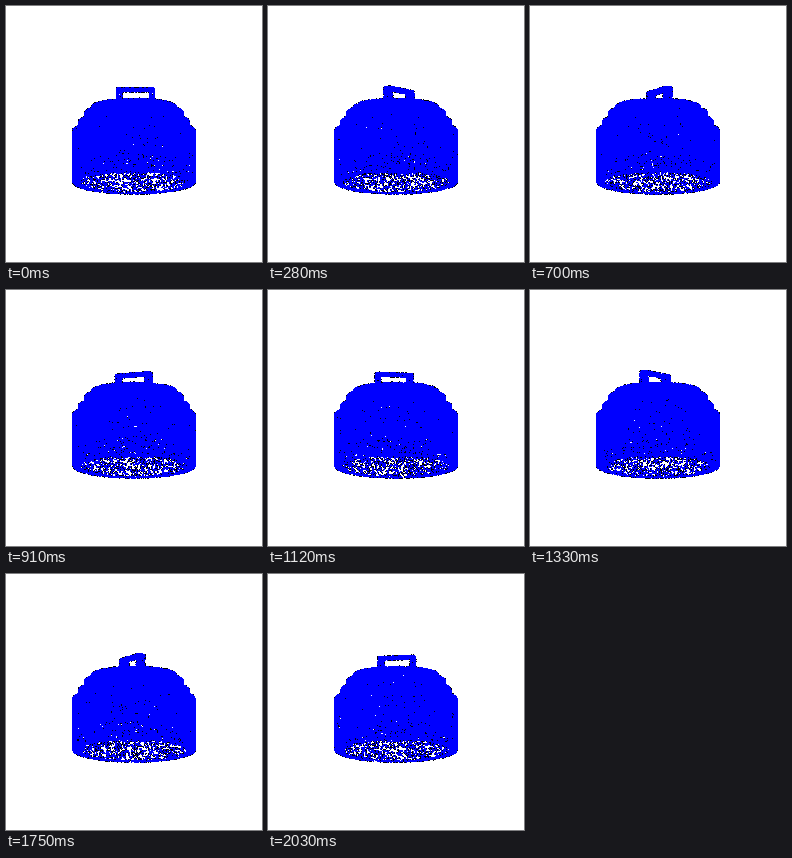
These frames come from a looping animation (256 by 256 pixels, 2100 ms). An HTML page with a canvas:

```html
<!DOCTYPE html>
<html>
<head>
<meta charset="utf-8">
<style>
html, body { margin: 0; width: 100%; height: 100%; overflow: hidden; background: #fff; }
canvas { display: block; width: 256px; height: 256px; }
</style>
</head>
<body>
<canvas id="stage" width="256" height="256"></canvas>
<script>
const SIZE = 256, STEPS = 30, STEP_MS = 70;
const CENTER = 128, HORIZON = -996, DIST = 6000, RADIUS = 1.02;
const DENSITY = 0.36;

const ctx = document.getElementById('stage').getContext('2d');
const image = ctx.createImageData(SIZE, SIZE);
const pixels = new Uint32Array(image.data.buffer);
const through = new Float32Array(SIZE * SIZE);
const points = [];

let seed = 71;
function rand() {
  seed = (seed + 0x6D2B79F5) | 0;
  let t = Math.imul(seed ^ (seed >>> 15), 1 | seed);
  t = (t + Math.imul(t ^ (t >>> 7), 61 | t)) ^ t;
  return ((t ^ (t >>> 14)) >>> 0) / 4294967296;
}
const between = (a, b) => a + (b - a) * rand();

function scatter(area, density, sample) {
  for (let n = Math.round(area * density); n > 0; n--) points.push(sample());
}

function wall(r, y0, y1, density = DENSITY) {
  scatter(2 * Math.PI * r * (y1 - y0), density, () => {
    const a = rand() * 2 * Math.PI;
    return [r * Math.cos(a), between(y0, y1), r * Math.sin(a)];
  });
}

function ring(r0, r1, y) {
  scatter(Math.PI * (r1 * r1 - r0 * r0), DENSITY, () => {
    const a = rand() * 2 * Math.PI;
    const r = Math.sqrt(between(r0 * r0, r1 * r1));
    return [r * Math.cos(a), y, r * Math.sin(a)];
  });
}

// Points on the six faces of a box given by [low, high] per axis
function box(...sides) {
  for (let axis = 0; axis < 3; axis++) {
    const area = sides.reduce((p, s, i) => i === axis ? p : p * (s[1] - s[0]), 1);
    for (let end = 0; end < 2; end++) {
      scatter(area, 0.6, () =>
        sides.map((s, i) => i === axis ? s[end] : between(s[0], s[1])));
    }
  }
}

// Stepped lid with an inner lining
const tiers = [[42, 100], [49, 106], [55, 115], [61, 124]];
const BASE = 176;
tiers.forEach(([r, y], i) => {
  const end = i < 3 ? tiers[i + 1][1] : BASE;
  ring(i ? tiers[i - 1][0] : 0, r, y);
  wall(r, y, end);
  wall(r - 7, y, i < 3 ? end : 157, 0.65);
});
ring(54, 61, BASE);

// Handle
const depth = [-6.7, 1.3];
box([-17, 19.8], [83.2, 85.6], depth);
box([-17, -12.4], [85.6, 100], depth);
box([16, 19.8], [85.6, 100], depth);

function splat(px, py) {
  const r2 = RADIUS * RADIUS;
  for (let y = Math.floor(py - RADIUS); y <= py + RADIUS; y++) {
    for (let x = Math.floor(px - RADIUS); x <= px + RADIUS; x++) {
      const dx = x + 0.5 - px, dy = y + 0.5 - py;
      const d = (dx * dx + dy * dy) / r2;
      if (d < 1) through[y * SIZE + x] *= d;
    }
  }
}

function render(step) {
  const angle = step / STEPS * 2 * Math.PI;
  const c = Math.cos(angle), s = Math.sin(angle);
  through.fill(1);
  for (const [x, y, z] of points) {
    const scale = DIST / (DIST - (x * s + z * c));
    splat(CENTER + (x * c - z * s) * scale, HORIZON + (y - HORIZON) * scale);
  }
  // Thin coverage is dark, full coverage is blue
  for (let i = 0; i < through.length; i++) {
    const t = through[i];
    pixels[i] = t === 1 ? 0xFFFFFFFF : t < 0.45 ? 0xFFFF0000 : 0xFF000000;
  }
  ctx.putImageData(image, 0, 0);
}

const start = performance.now();
let shown = -1;
function tick() {
  const step = Math.floor((performance.now() - start) / STEP_MS) % STEPS;
  if (step !== shown) render(shown = step);
  requestAnimationFrame(tick);
}
tick();
</script>
</body>
</html>
```
